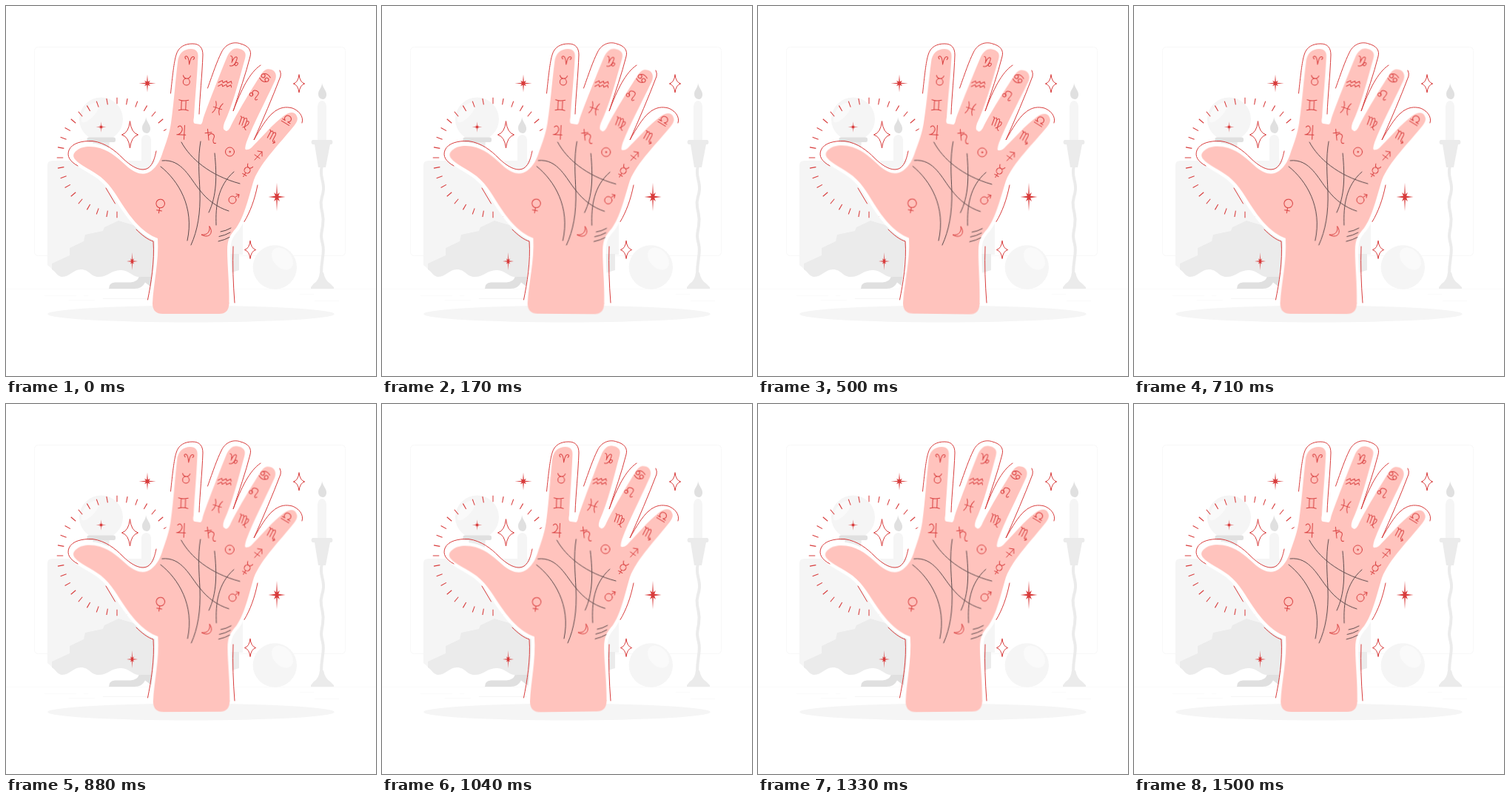
Animation, 500 px wide and 500 px high, one loop 1.54 s. Source, as an HTML page without scripts:

```html
<!DOCTYPE html>
<html lang="en">
<head>
<meta charset="utf-8">
<title>Palm reading</title>
<style>
html, body { margin: 0; width: 100%; height: 100%; overflow: hidden; background: #fff; }
svg { display: block; width: 100%; height: 100%; }
.pale { fill: #f5f5f5; }
.mid { fill: #ebebeb; }
.dark { fill: #e0e0e0; }
.shine { fill: #fafafa; }
.frame { fill: none; stroke: #f8f8f8; }
.line { fill: none; stroke: #d83c3c; stroke-linecap: round; stroke-linejoin: round; }
.burst { fill: #d83c3c; }
.crease { fill: none; stroke: #5a4a4c; stroke-linecap: round; }
.skin { fill: #ffc3bd; }
.halo { stroke: #fff; stroke-width: 9; stroke-linejoin: round; paint-order: stroke; }
.hand { transform-origin: 242px 237px; animation: sway 1540ms linear infinite; }
@keyframes sway {
  25% { transform: rotate(1deg); }
  75% { transform: rotate(-1deg); }
}
</style>
</head>
<body>
<svg viewBox="0 0 500 500">
  <defs>
    <path id="sparkle" vector-effect="non-scaling-stroke" d="M0-12Q1.200-1.700 7.600 0Q1.200 1.700 0 12Q-1.200 1.700-7.600 0Q-1.200-1.700 0-12Z"/>
    <path id="burst" d="M0-12L.8-2.200 3.800-3.800 2.200-.8 11.500 0 2.200 .8 3.800 3.800 .8 2.200 0 12-.8 2.200-3.800 3.800-2.200 .8-11.500 0-2.200-.8-3.800-3.800-.8-2.200Z"/>
  </defs>

  <!-- room -->
  <g class="frame">
    <rect x="38.5" y="55.5" width="204" height="282" rx="5"/>
    <rect x="253.5" y="55.5" width="205" height="282" rx="5"/>
  </g>
  <g class="mid">
    <path d="M0 382.2H500v.4H0Z"/>
    <path d="M417 398.5h33v.3h-33ZM397 389.2h19v.3h-19ZM52 390.9h43v.3h-43ZM105 390.9h6v.3h-6ZM131 395.1h94v.3h-94ZM85 397.3h35v.3h-35Z"/>
  </g>
  <ellipse class="pale" cx="250" cy="416.2" rx="193.9" ry="11.3"/>

  <!-- table -->
  <path class="dark" d="M139 382Q139 374 147 373.500H168Q178 373 180 365L184 360H206V382Q199 382 195 379L188 373.500Q184 382 174 382Z"/>
  <path class="pale" d="M56 350V215Q56 209 63 209H313Q320 209 320 216V336H300V355H62Z"/>
  <path class="mid" d="M62 348L86 337V327L105 318 107 309 131 304 133 299 152 290 175 297 215 310V366H182C172 368 167 357 156 357C143 356 138 366 125 366C114 366 113 356 101 356C91 356 86 366 76 366C70 366 67 359 62 356ZM298 335H315V357L298 362Z"/>

  <!-- ornaments -->
  <circle class="pale" cx="128.500" cy="153" r="29.500"/>
  <path class="shine" d="M126 131C114 128 100 143 102 156C106 162 128 144 126 131Z"/>
  <path class="mid" d="M117 183H140L137 209H120Z"/>
  <rect class="dark" x="109.500" y="177.500" width="38.500" height="6.500" rx="2.500"/>
  <path class="pale" d="M183 215V181Q183 175 189.500 174Q196 175 196 181V215Z"/>
  <path id="flame" class="dark" d="M189 150C190 157 196 161 195 167Q194 172 190 172Q184 171 184 165C184 159 189 157 189 150Z"/>
  <use href="#flame" x="238" y="-46"/>
  <path class="pale" d="M421 182V136Q422 128 427 128Q432 128 433 136V182Z"/>
  <path class="mid" d="M414 181H440Q443 184 440 187H438L432 218H422L417 187H414Q411 184 414 181ZM424 360H429Q431 371 438 375L443 380V382H412V380L416 375Q423 371 424 360Z"/>
  <path d="M427 216C423 230 430 236 429 248S424 260 426 272S430 285 428 297S425 310 428 322S426 341 426 362" fill="none" stroke="#ebebeb" stroke-width="4"/>
  <circle class="pale" cx="363.300" cy="353" r="29.700"/>
  <ellipse class="shine" cx="373.500" cy="341.500" rx="17" ry="12" transform="rotate(48 373.500 341.500)"/>

  <!-- ring and stars -->
  <circle cx="150" cy="205" r="77" fill="none" stroke="#d83c3c" stroke-width="8.500" pathLength="360" stroke-dasharray=".8 9.2" stroke-dashoffset=".4"/>
  <g class="line" style="fill:#fff">
    <use href="#sparkle" transform="translate(167.500 174) scale(1.450 1.500)"/>
    <use href="#sparkle" transform="translate(396 105)"/>
    <use href="#sparkle" transform="translate(330 329.500)"/>
  </g>
  <g class="burst">
    <use href="#burst" transform="translate(191 104.500)"/>
    <use href="#burst" transform="translate(366 258) scale(1 1.600)"/>
    <use href="#burst" transform="translate(128.500 163.500) scale(.6)"/>
    <use href="#burst" transform="translate(170.500 345) scale(.65 1)"/>
  </g>

  <g class="hand">
    <path class="skin halo" d="M198 402C199 376 207 345 205 314C186 307 171 289 161 274C150 258 143 243 128 231C116 222 100 215 94 208C90 204 90 199 96 195C103 189 116 189 127 192C143 197 154 208 165 218C177 228 188 229 196 223C205 216 209 207 212 197C217 183 221 172 223 158C227 130 229 100 232 76C233 64 240 58 250 58C257 58 260 62 259.500 69C258 100 255 130 254 150Q252 159 256 159L263 160Q265 160 266.500 152C276 125 290 90 299 68C304 58 310 56 316 58C323 60 325 64 323 71C315 100 306 135 295 158Q292 167 296 168Q299 171 303 164C312 145 332 112 345 92C350 84 356 84 361 87C366 91 366 97 362 104C350 130 334 160 325 184Q321 196 326 194Q330 194 334 189C346 177 360 160 376 148C384 142 391 143 393 149C395 153 393 157 390 161C371 185 345 210 335 235C328 258 322 285 311 300C303 309 299 315 299 330C299 350 302 375 301.500 402"/>
    <path class="skin" d="M198 401H301.500V402Q301 416 288 416H212Q198 416 198 402Z"/>
    <g class="crease">
      <path d="M237 184C249 206 275 229 316 240M211 209C238 206 249 234 262 249C272 262 285 272 301 277M209 217C233 236 255 272 245 317M263 183C259 205 261 228 262 250C263 280 259 303 250 323M282 199C285 230 285 256 274 279M308 224C286 243 283 270 284 296"/>
      <path d="M290 305Q297 304 304 300M288 311.500Q296 310 303 306M287 318Q296 316 302 312.500"/>
    </g>
    <!-- zodiac and planet signs -->
    <g class="line">
      <path transform="translate(248 73) rotate(4)" d="M-5-1C-8-4-5-6-3-4Q-1-2 0 6Q1-2 3-4C5-6 8-4 5-1"/>
      <path transform="translate(244 100) rotate(4)" d="M-5-6Q-4-2 0-2T5-6M4.500 2.500a4.500 4.500 0 1 0-9 0a4.500 4.500 0 1 0 9 0"/>
      <path transform="translate(240 134) rotate(2)" d="M-6.500-7Q0-5 6.500-7M-6.500 7Q0 5 6.500 7M-3-6V6M3-6V6"/>
      <path transform="translate(237 170) rotate(3)" d="M-5-6C-2-11 3-5 0 0Q-2 4-6 4H6M4-9V10"/>
      <path transform="translate(307.500 75) rotate(18)" d="M-6-6Q-3-7-2 0V2Q-1-7 2-7Q4-7 3 0Q2 7-3 7M3 2C4-2 8 0 6 3C5 6 2 4 3 1"/>
      <path transform="translate(296 105) rotate(5)" d="M-9-1L-4-4-3-1 2-4 3-1 8-4 9-1M-9 4L-4 1-3 4 2 1 3 4 8 1 9 4"/>
      <path transform="translate(286 138) rotate(18)" d="M-5-8Q0 0-5 8M5-8Q0 0 5 8M-6 0H6"/>
      <path transform="translate(276.500 176) rotate(-6)" d="M-7-5H2M-3-10V5M-3-1C1-6 7-2 4 3C1 7 3 11 6 10"/>
      <path transform="translate(350 97) rotate(32)" d="M-6-2Q-1-8 6-4M6 2Q1 8-6 4M-1-1a2.500 2.500 0 1 0-5 0a2.500 2.500 0 1 0 5 0M6 1a2.500 2.500 0 1 0-5 0a2.500 2.500 0 1 0 5 0"/>
      <path transform="translate(336 120) rotate(25)" d="M-2 2a2.300 2.300 0 1 0-4 1a2.300 2.300 0 0 0 4-1C-6-3-4-6 0-6C6-6 4-1 3 2C2 6 4 7 6 4"/>
      <path transform="translate(321.500 157) rotate(20)" d="M-7-6Q-5-7-5-3V5M-5-4Q-2-9-1-3V5M-1-4Q2-9 3-3V4Q3 8 6 9M3-2C7-6 9 1 1 7"/>
      <circle cx="302.500" cy="197" r="6"/>
      <circle cx="302.500" cy="197" r=".8"/>
      <path transform="translate(380 154) rotate(32)" d="M-6 5H6M-6 2H-2C-7-1-4-6 0-6S7-1 2 2H6"/>
      <path transform="translate(360 176) rotate(28)" d="M-7-6Q-5-7-5-3V5M-5-4Q-2-9-1-3V5M-1-4Q2-9 3-3V4Q3 7 7 6M5 4L7 6 5 8"/>
      <path transform="translate(341 202)" d="M-5 6L5-5M-1-6L5-5 5 1M-5-1L2 4"/>
      <path transform="translate(326 222) rotate(32)" d="M-4-8Q-3-4 0-4T4-8M4 0a4 4 0 1 0-8 0a4 4 0 1 0 8 0M0 4V10M-3 7H3"/>
      <path transform="translate(308 260)" d="M3 2a5 5 0 1 0-10 0a5 5 0 1 0 10 0M2-2L7-5M3-6L7-5 6-1"/>
      <path transform="translate(208.500 268) rotate(10)" d="M5.800-1a5.800 5.800 0 1 0-11.600 0a5.800 5.800 0 1 0 11.600 0M0 5V12M-3.500 8.500H3.500"/>
      <path transform="translate(271 304)" d="M4-6C10 2 4 11-7 5C1 6 5 1 4-6Z"/>
    </g>
  </g>

  <!-- loose contour -->
  <path class="line" d="M222.500 118C225 95 227 75 230 66C233 55 242 51 252 51C262 51 266 57 266 66C265 95 262 120 261 146M272.500 111C280 90 285 75 291 63C297 50 309 48 317 51C328 54 332 60 330 68C324 92 315 117 307 142C318 113 329 90 344 80M370 87Q372 91 371 95C360 124 347 154 335 181C344 165 352 152 360 145C370 136 379 136 387 138C395 141 403 149 400 158"/>
  <path class="line" d="M97 216C86 210 82 203 85 195C89 185 103 182 117 182.500C135 185 148 196 157 205C168 216 182 225 192 219C199 214 201 205 203 196M135 246L147.500 267M176 302C184 310 192 316 199 318C201 345 196 375 191.500 397M340 242C336 262 330 278 322 291.500M307 325C306 350 307 375 309 401"/>
</svg>
</body>
</html>
```
